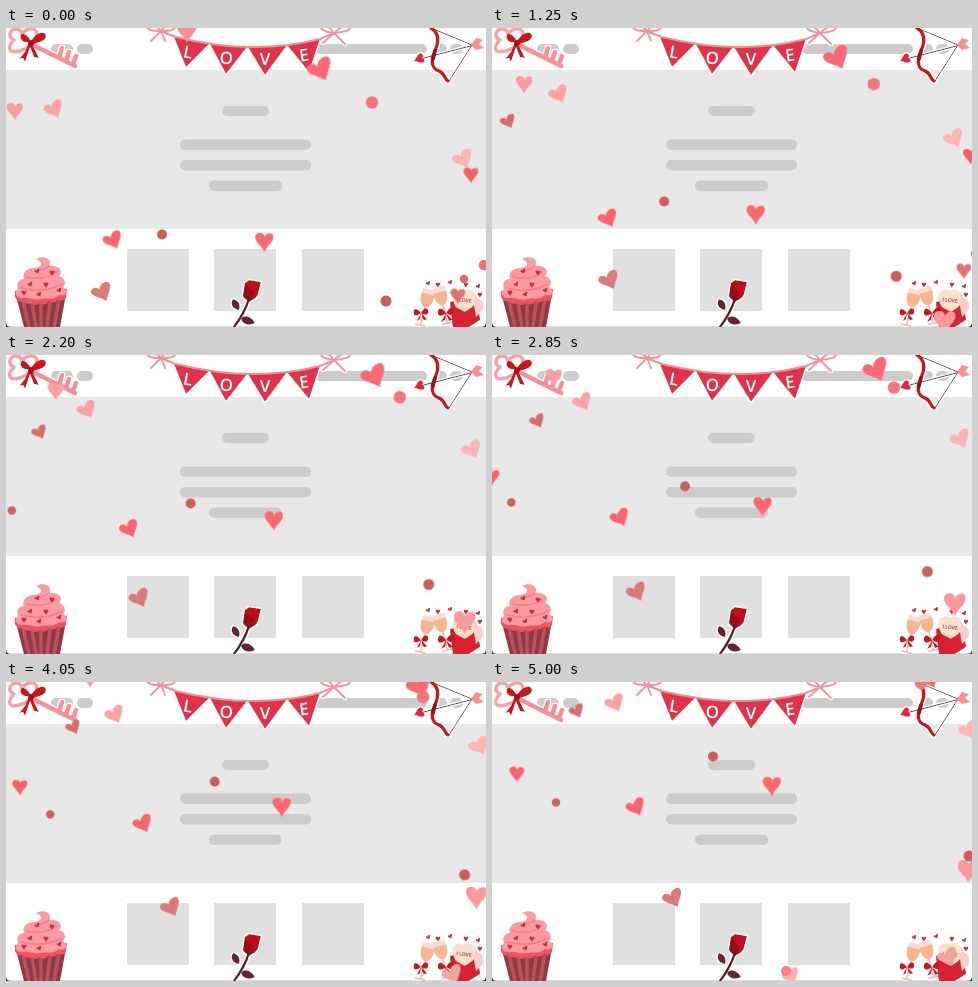
Animation of 480 by 299 pixels, one loop 5.05 s. Source, as an HTML page:

```html
<!DOCTYPE html>
<html lang="en">
<head>
<meta charset="utf-8">
<title>Valentine page</title>
<style>
  html, body { margin: 0; width: 100%; height: 100%; overflow: hidden; background: #fff; }
  svg { display: block; width: 100vw; height: 100vh; }
  .line { fill: none; stroke-linecap: round; stroke-linejoin: round; }
  .drift { animation: drift 5050ms steps(101) infinite; }
  @keyframes drift {
    from { transform: translate(0, 0); }
    to { transform: translate(var(--dx), var(--dy)); }
  }
</style>
</head>
<body>
<svg viewBox="0 0 480 299">
  <defs>
    <path id="heart" d="M0 11C-2 5-10 0-10-5C-10-9-7-10-5-10C-2-10 0-8 0-5.500C1-8 3-9.500 6-9.500C9-9.500 10-7 9.500-4C8.500 1 2 5 0 11Z"/>
    <path id="leaning" d="M5.500 10C0 6-9 6-10 1C-10-3.500-4-5-1.500-1C-1.500-6 3-10 7-9C12-6 6.500 3 5.500 10Z"/>
    <filter id="sticker" x="-20%" y="-20%" width="140%" height="140%">
      <feMorphology in="SourceAlpha" operator="dilate" radius="1" result="grown"/>
      <feFlood flood-color="#fff"/>
      <feComposite in2="grown" operator="in"/>
      <feMerge><feMergeNode/><feMergeNode in="SourceGraphic"/></feMerge>
    </filter>
    <g id="glass">
      <path d="M-6-10L6-10C8 0 5 9 0 9C-5 9-8 0-6-10Z" fill="#fbdcd4"/>
      <path d="M-6.500-5L6.500-5C7 3 4 8 0 8C-4 8-7 3-6.500-5Z" fill="#f5b68f"/>
      <path class="line" d="M0 8V26M-5 27H5" stroke="#efb8a8" stroke-width="1.500"/>
    </g>
    <path id="bow" d="M0 0C-5-7-9-5-8 1C-7 4-3 3 0 0C3-6 8-7 8-2C8 3 4 3 0 0L-5 9L-1 7L0 1L3 8L7 7Z"/>
  </defs>

  <!-- page -->
  <rect width="480" height="299" fill="#fff"/>
  <rect y="42" width="480" height="159" fill="#e8e8e8"/>
  <g fill="#ccc">
    <rect x="45" y="16" width="22" height="10" rx="5"/>
    <rect x="71" y="16" width="16" height="10" rx="5"/>
    <rect x="309" y="16" width="112" height="10" rx="5"/>
    <rect x="428" y="16" width="13" height="10" rx="5"/>
    <rect x="444" y="16" width="13" height="10" rx="5"/>
    <rect x="216" y="78" width="47" height="10" rx="5"/>
    <rect x="174" y="111.500" width="131" height="10.500" rx="5"/>
    <rect x="174" y="132" width="131" height="10.500" rx="5"/>
    <rect x="203" y="152.500" width="73" height="10.500" rx="5"/>
  </g>
  <path d="M121 221h62v62h-62zM208 221h62v62h-62zM296 221h62v62h-62z" fill="#e0e0e0"/>
  <path d="M0 298.500H480" stroke="#ddd"/>
  <path d="M0 294Q0 299 5 299H0ZM480 294Q480 299 475 299H480Z" fill="#333"/>

  <!-- key -->
  <g filter="url(#sticker)">
    <path class="line" d="M27 17L69 38M53 30L56 20M60 33L63 24M67 36L70 28" stroke="#f98f95" stroke-width="4.500"/>
    <path class="line" d="M25 17C18 23 8 25 5 23C2 20 5 15 8 12C1 9 4 1 10 1C14 1 16 4 16 6C19 1 27-1 30 3C33 8 29 14 25 17Z" stroke="#f9a0a5" stroke-width="3.500"/>
    <path d="M25 13C18 2 13 6 15 11C17 15 21 15 25 13C31 3 40 3 40 8C40 13 32 15 26 16L33 30L28 29L24 19L19 34L17 30L13 31C17 27 21 22 22 16Z" fill="#c9151c"/>
    <circle cx="25" cy="15" r="3" fill="#a50f19"/>
  </g>

  <!-- bunting -->
  <g filter="url(#sticker)">
    <g fill="#e0314a">
      <path d="M168 9L203 16L180 39Z"/>
      <path d="M204 16L241 19L220 46Z"/>
      <path d="M242 19L281 17L259 47Z"/>
      <path d="M281 17L314 11L303 44Z"/>
    </g>
    <path class="line" d="M155 3Q164 7 170 9Q246 28 314 11Q323 7 329 5" stroke="#f08d97" stroke-width="2"/>
    <path class="line" d="M155 3C149-4 142-5 141-1C142 3 149 3 155 3C160-4 166-4 169-1C169 3 161 3 155 3L145 13M155 3L159 13M328 5C322-3 315-5 315 0C317 4 323 4 328 5C336-2 343-5 344 0C343 4 334 4 328 5L317 15M328 5L339 16" stroke="#f2949d" stroke-width="2"/>
    <g fill="#fff" font-family="'Open Sans', sans-serif" font-size="17" font-weight="600" text-anchor="middle">
      <text transform="translate(181 30) rotate(10)">L</text>
      <text transform="translate(220 36) rotate(4)">O</text>
      <text transform="translate(259 37)">V</text>
      <text transform="translate(299 33) rotate(-9)">E</text>
    </g>
  </g>

  <!-- bow and arrow -->
  <g filter="url(#sticker)">
    <path class="line" d="M425 0L466 17L443 53" stroke="#6b2530"/>
    <path class="line" d="M425 0C433 5 433 14 429 23C424 33 426 41 433 43C439 45 438 51 442 53" stroke="#c9151c" stroke-width="3.500"/>
    <path class="line" d="M414 31L472 16" stroke="#5a2430" stroke-width="1.200"/>
    <path d="M465 17L470 10L477 12L473 16L478 20L470 22Z" fill="#f98f95"/>
    <use href="#heart" transform="translate(413 31) rotate(70) scale(.5)" fill="#e5213c"/>
    <path class="line" d="M429 23L427 31" stroke="#8d1420" stroke-width="4"/>
  </g>

  <!-- cupcake -->
  <g>
    <path d="M10 268Q35 278 60 266L54 299H18Z" fill="#8f3a46"/>
    <path class="line" d="M17 273L23 299M26 275L30 299M35 276V299M44 275L41 299M53 271L48 299" stroke="#b8535c" stroke-width="3.500"/>
    <path d="M9 263Q35 266 61 261L60 270Q56 275 52 271Q48 277 43 273Q39 279 34 275Q29 279 25 275Q20 277 17 273Q12 275 9 269Z" fill="#f2525f"/>
    <path d="M30 231C39 226 47 232 43 238C55 237 57 244 53 248C60 250 60 257 57 259C64 264 59 269 53 267C47 273 40 269 35 271C28 273 23 269 18 270C11 271 7 265 12 261C10 255 13 251 18 251C16 245 20 241 27 240C35 240 39 235 30 231Z" fill="#fb9aa1"/>
    <path class="line" d="M21 249Q40 253 50 244M15 260Q38 266 56 256M43 238Q38 242 31 242" stroke="#f07f8a" stroke-width="1.500"/>
    <g id="sprinkles" fill="#d2283b"></g>
  </g>

  <!-- rose -->
  <g filter="url(#sticker)">
    <path class="line" d="M243 271Q238 286 228 299" stroke="#5a1d2c" stroke-width="2.500"/>
    <path d="M233 282C226 281 224 275 227 271C232 272 235 276 233 282ZM235 291C237 287 244 287 249 295C243 298 237 297 235 291Z" fill="#6b2032"/>
    <path d="M239 255L243 252L249 253L255 254L252 266C249 274 240 273 237 268Z" fill="#c00d1a"/>
    <path d="M239 255Q242 262 248 263Q247 271 242 271L237 268Z" fill="#970a17"/>
    <path d="M236 268L243 271L249 270L243 274Z" fill="#5a1d2c"/>
  </g>

  <!-- glasses and card -->
  <g filter="url(#sticker)">
    <use href="#glass" transform="translate(421 271) rotate(14)"/>
    <use href="#glass" transform="translate(435 269) rotate(-14)"/>
    <path d="M444 274L470 267L474 291L462 299H447Z" fill="#c21d2d"/>
    <path d="M447 272C445 264 451 259 458 263C463 259 471 263 470 271C469 279 463 283 458 284C452 283 448 278 447 272Z" fill="#fbe0cc"/>
    <path d="M444 276L459 284L471 276L474 292L463 299H447Z" fill="#d82433"/>
    <path d="M467 272C474 268 480 275 476 283L470 289Z" fill="#f8cfc9"/>
    <use href="#bow" transform="translate(415 285) scale(.9)" fill="#c9151c"/>
    <use href="#bow" transform="translate(440 285)" fill="#c9151c"/>
    <text transform="translate(458 274) rotate(6)" text-anchor="middle" font-family="Lato, sans-serif" font-size="5" font-weight="700" fill="#a04445">I LOVE</text>
  </g>
  <g id="sparks" fill="#d2283b"></g>
  <g id="particles"></g>
</svg>
<script>
  const NS = 'http://www.w3.org/2000/svg';
  const LOOP = 5.05;

  function add(parent, tag, attrs) {
    const node = document.createElementNS(NS, tag);
    for (const name in attrs) node.setAttribute(name, attrs[name]);
    return parent.appendChild(node);
  }

  function addShape(parent, shape, x, y, width) {
    add(parent, 'use', {
      href: '#' + shape,
      transform: `translate(${x} ${y}) scale(${width / 20})`
    });
  }

  function scatter(id, width, points) {
    const parent = document.getElementById(id);
    points.forEach(([x, y], i) => addShape(parent, i % 2 ? 'heart' : 'leaning', x, y, width));
  }

  scatter('sprinkles', 5, [[31, 243], [46, 245], [24, 256], [40, 257], [53, 262], [18, 265], [33, 266]]);
  scatter('sparks', 4.5, [[422, 255], [432, 257], [444, 254], [460, 257], [472, 258], [474, 267]]);

  const particles = document.getElementById('particles');

  // Positions in px, speeds in px per second.
  function drift(x, y, vx, vy, color) {
    const group = add(particles, 'g', { class: 'drift', fill: color });
    group.style.setProperty('--dx', vx * LOOP + 'px');
    group.style.setProperty('--dy', vy * LOOP + 'px');
    return group;
  }

  function heart(x, y, vx, vy, width, color) {
    addShape(drift(x, y, vx, vy, color), 'heart', x, y, width);
  }

  function leaning(x, y, vx, vy, width, color) {
    addShape(drift(x, y, vx, vy, color), 'leaning', x, y, width);
  }

  function dot(x, y, vx, vy, r, color) {
    add(drift(x, y, vx, vy, color), 'circle', { cx: x, cy: y, r });
  }

  heart(9, 83, 18.6, -21.3, 16.5, '#fb9ca0');
  heart(-33, 162, 11.6, -14, 15, '#fb6066');
  heart(258.500, 214, 4.3, -22, 18.5, '#fc686e');
  heart(465, 147, 11, -15, 15, '#f85c61');
  heart(452, 268, 16, -20, 15, '#dc7572');
  heart(445, 329, 6.3, -28, 22, '#fa989a');
  heart(181, 4, 8, -22, 20, '#fa8d92');

  leaning(47, 80, 15, -12, 19, '#fda1a3');
  leaning(-7.500, 114, 18.3, -17.200, 15, '#d86c6a');
  leaning(106, 211, 7.4, -17.400, 19, '#fb646a');
  leaning(95, 263, 17, -9.600, 20, '#da7b79');
  leaning(313, 40, 24.500, -9.300, 25, '#fb6a74');
  leaning(456, 130, 4, -16.600, 20, '#fbb3b4');
  leaning(262, 388, 7.2, -19, 17, '#fdabad');
  leaning(405, 364, 10, -18, 20, '#f1a49c');

  dot(-40, 183, 20.800, -12.500, 4.300, '#cf625f');
  dot(156, 206.500, 13, -26.400, 5, '#cd5e5b');
  dot(366, 74.500, 12.600, -14.700, 6.200, '#f1777a');
  dot(380, 273, 19.400, -19.800, 5.500, '#cd5e5b');
  dot(458, 251, 20, -20, 4.200, '#d96b68');
  dot(478, 237, 16, -14, 5.300, '#ec7374');
  dot(264, 389, 6, -20, 5, '#f87f82');
</script>
</body>
</html>
```
